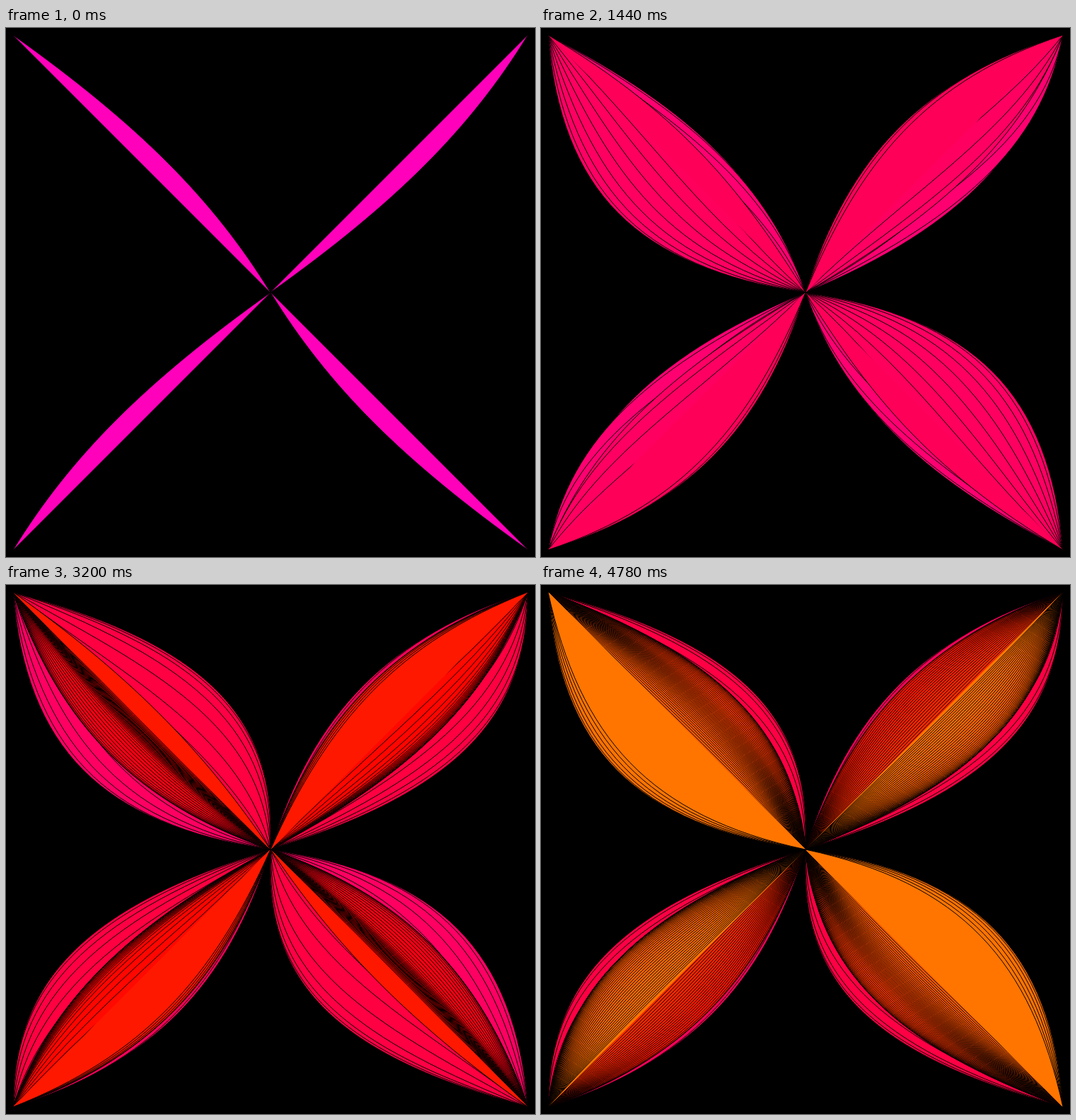
These frames come from a looping animation (748x748 px, 4800 ms). An HTML page with a canvas:

```html
<!DOCTYPE html>
<html lang="en">
<head>
<meta charset="utf-8">
<title>Petals</title>
<style>
html, body { margin: 0; width: 100%; height: 100%; overflow: hidden; background: #000; }
canvas { display: block; width: 748px; height: 748px; }
</style>
</head>
<body>
<canvas id="stage" width="748" height="748"></canvas>
<script>
const STEP = 20, COUNT = 240, CENTER = 374, REACH = 364, LAG = 1.5;
const ctx = document.getElementById('stage').getContext('2d');

// [step, bulge] keys; positive bulges to the right of the chord
const FALLING = [
  [0, .07], [7, -.06], [15, .08], [20, -.09], [27, .1], [35, -.14], [45, .04],
  [52, .14], [61, -.285], [72, .11], [84, .275], [87, .24], [91, .03], [100, .015],
  [113, -.165], [116, -.17], [130, -.06], [150, -.005], [160, .07], [176, .21],
  [192, .14], [218, 0], [233, -.285], [239, -.22]
];
const RISING = [
  [0, .07], [6, -.05], [13, .09], [20, -.08], [29, .14], [42, -.125], [45, -.09],
  [52, .185], [57, -.14], [62, .13], [69, -.19], [72, -.15], [85, .25], [99, -.17],
  [108, -.025], [113, 0], [124, .1], [132, .13], [142, .1], [155, -.17],
  [160, -.14], [177, 0], [194, .185], [207, .2], [239, .005]
];

const slope = (keys, i) => (keys[i + 1][1] - keys[i][1]) / (keys[i + 1][0] - keys[i][0]);

// Harmonic mean keeps the curve from overshooting its keys
function tangent(keys, i) {
  if (i === 0) return slope(keys, 0);
  if (i === keys.length - 1) return slope(keys, i - 1);
  const a = slope(keys, i - 1), b = slope(keys, i);
  return a * b > 0 ? 2 * a * b / (a + b) : 0;
}

function bulgeAt(keys, step) {
  if (step <= 0) return keys[0][1];
  let i = 0;
  while (i < keys.length - 2 && keys[i + 1][0] < step) i++;
  const [t0, v0] = keys[i], [t1, v1] = keys[i + 1];
  const d = t1 - t0, s = (step - t0) / d, r = 1 - s;
  return v0 * r * r * (1 + 2 * s) + v1 * s * s * (3 - 2 * s)
    + d * s * r * (tangent(keys, i) * r - tangent(keys, i + 1) * s);
}

// Curve from (x, y) along a diagonal, with dy = 1 falling and dy = -1 rising
function petal(x, y, dy, a, b) {
  const at = (f, e) => [x + REACH * (f + e), y + dy * REACH * (f - e)];
  ctx.beginPath();
  ctx.moveTo(x, y);
  ctx.bezierCurveTo(...at(.4 + .26 * a, a), ...at(.69 + .24 * b, b), ...at(1, 0));
  ctx.fill();
  ctx.stroke();
}

function drawStep(n) {
  const hue = (316 + .335 * n - .00015 * n * n) % 360;
  ctx.fillStyle = `hsl(${hue}, 100%, 50%)`;
  const pair = keys => [bulgeAt(keys, n), bulgeAt(keys, n - LAG)];
  const falling = pair(FALLING), rising = pair(RISING);
  for (let turn = 0; turn < 2; turn++) {
    ctx.save();
    ctx.translate(CENTER, CENTER);
    ctx.rotate(turn * Math.PI);
    petal(-REACH, -REACH, 1, ...falling);
    petal(0, 0, -1, ...rising);
    ctx.restore();
  }
}

let last = -1;
function render(now) {
  const n = Math.floor(now / STEP) % COUNT;
  if (n < last || last < 0) {
    ctx.fillStyle = '#000';
    ctx.fillRect(0, 0, 748, 748);
    last = -1;
  }
  while (last < n) drawStep(++last);
}

ctx.strokeStyle = '#000';
ctx.lineWidth = 1;
const start = performance.now();
function tick() {
  render(performance.now() - start);
  requestAnimationFrame(tick);
}
tick();
</script>
</body>
</html>
```
